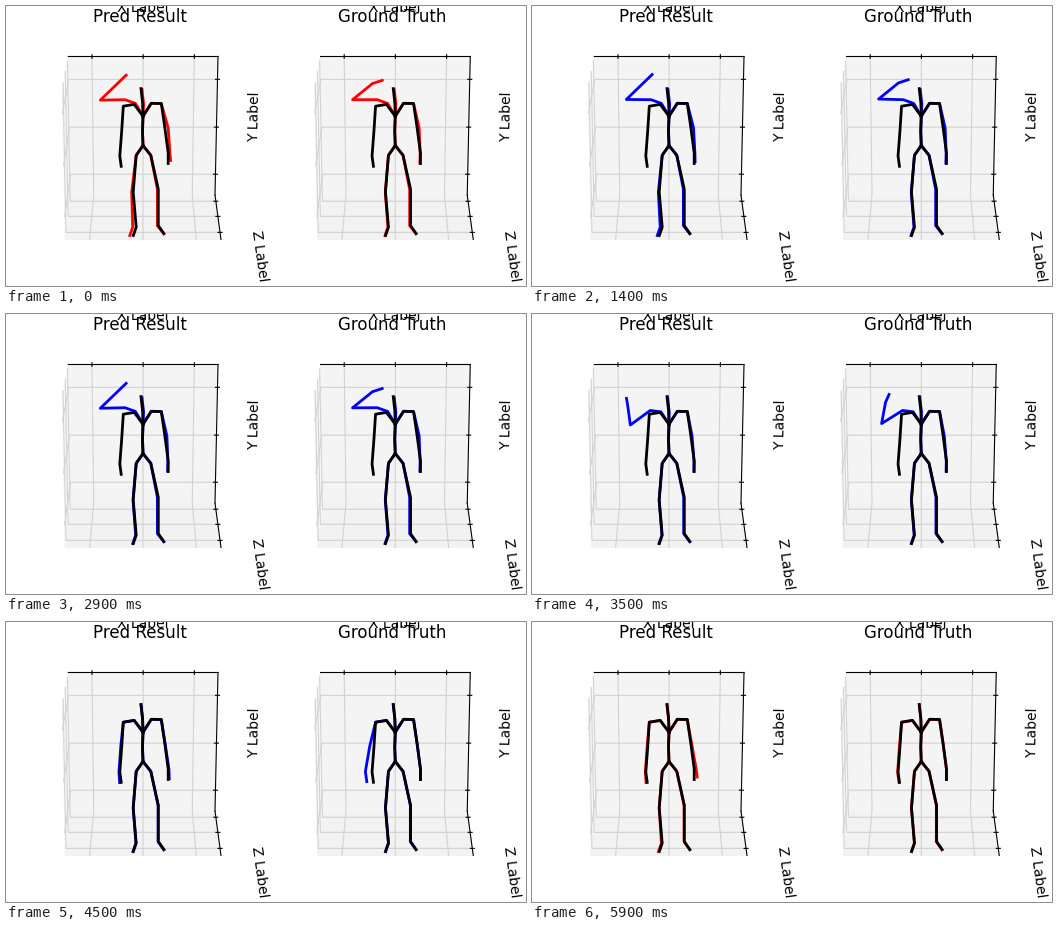
These frames come from a looping animation (520x280 px, 6 s). A matplotlib script:

```python
import numpy as np
import matplotlib.pyplot as plt
from matplotlib.animation import FuncAnimation

W, H, DPI = 520, 280, 100
FRAMES, INTERVAL = 60, 100
PANEL_SHIFT = 252.25
FIRST_BLUE, LAST_BLUE = 10, 49

plt.rcParams["font.family"] = "DejaVu Sans"
fig = plt.figure(figsize=(W / DPI, H / DPI), dpi=DPI, facecolor="white")
ax = fig.add_axes([0, 0, 1, 1])
ax.set_xlim(0, W)
ax.set_ylim(H, 0)
ax.axis("off")

# Reference pose, one chain of joints per limb
NECK, PELVIS = (137, 110.2), (137, 139.5)
REST = {
    "head": [(135, 82.6), (136.6, 97), NECK],
    "spine": [NECK, (136.5, 125), PELVIS],
    "left_arm": [NECK, (128.2, 98.4), (117.3, 100.2), (115.7, 125),
                 (113.8, 150), (115.2, 160.3)],
    "right_arm": [NECK, (145.3, 97.3), (155.3, 97.5), (158.9, 122),
                  (162.2, 147), (162.2, 157.5)],
    "left_leg": [PELVIS, (130.2, 149.3), (127.2, 186), (130.2, 221.2),
                 (127.3, 229.5)],
    "right_leg": [PELVIS, (144.8, 149.3), (152.3, 183.3), (152.3, 219.6),
                  (157.8, 227.6)],
}

# Arm angles in degrees, clockwise from screen right: raised, lowered, settled
PRED = dict(upper=(179, 96, 95), fore=(316, 94, 94), hand=(316, 86, 86),
            start=31, drift=1)
TRUE = dict(upper=(180, 104, 95), fore=(321, 100, 94), hand=(342, 82, 82),
            start=31.8, drift=0)
UPPER_LEN, FORE_LEN, HAND_LEN = 24.7, 25.7, 10.2


def ease(t, start, end):
    u = np.clip((t - start) / (end - start), 0, 1)
    return u * u * (3 - 2 * u)


def mix(a, b, u):
    a, b = np.asarray(a, float), np.asarray(b, float)
    return a + (b - a) * u


def step(point, length, angle):
    a = np.radians(angle)
    return point + length * np.array((np.cos(a), np.sin(a)))


def waving_arm(style, t):
    """Raised arm that drops: the upper arm leads, the forearm swings after."""
    drop = ease(t, 28.5, 43)
    swing = ease(t, style["start"], 43.5)
    settle = ease(t, 44, 52)

    def angle(part, u):
        raised, lowered, settled = style[part]
        return mix(raised, lowered, u) + (settled - lowered) * settle

    wobble = 1.5 * np.sin(np.pi * min(t, 28) / 28)
    depth = 1 - 0.53 * np.sin(np.pi * swing) ** 2
    shoulder = mix((119, 93.7), REST["left_arm"][2], drop)
    elbow = step(shoulder, UPPER_LEN, angle("upper", drop) + wobble)
    wrist = step(elbow, FORE_LEN * depth, angle("fore", swing))
    hand = step(wrist, HAND_LEN * depth, angle("hand", swing))
    return [shoulder, elbow, wrist, hand], 1 - drop


def moving_pose(style, t):
    pose = {name: np.array(pts, float) for name, pts in REST.items()}
    arm, lift = waving_arm(style, t)
    early = style["drift"] * (1 - ease(t, 8, 20))
    late = style["drift"] * ease(t, 41, 51)
    sway = early + late

    pose["left_arm"][1] += (1.2 * lift, -lift)
    pose["left_arm"][2:] = arm
    pose["head"][:2, 0] += lift
    pose["head"][:2, 1] += lift
    pose["right_arm"][3:, 0] += (2 * lift + 1.3 * early + 0.8 * late,
                                 2 * sway - 0.3 * lift, 3 * sway - 0.6 * lift)
    pose["right_arm"][5, 1] -= 2.5 * sway + 0.5 * lift
    foot = 3 * early + 0.8 * late + 0.5 * lift
    pose["left_leg"][2:, 0] -= (1.3 * early + 0.2 * lift, foot, foot)
    pose["right_leg"][2:4, 0] -= 0.2 + 0.7 * lift
    return pose


def stroke(pts, dx, color, lw, z):
    x, y = np.array(pts, float).T
    return ax.plot(x + dx, y, color=color, lw=lw, zorder=z, snap=False)[0]


def draw_box(dx):
    top_l, top_r = (62.3, 50.5), (212, 50.5)
    low_l, low_r = (65, 189), (209, 189)
    front_top, front_l, front_r = (56, 82), (59, 233.5), (215, 233.5)

    panes = [((top_l, low_l, front_l, front_top), "#f8f8f8"),
             ((low_l, low_r, front_r, front_l), "#f2f2f2"),
             ((top_l, top_r, low_r, low_l), "#f4f4f4")]
    for corners, color in panes:
        x, y = np.array(corners).T
        ax.fill(x + dx, y, color=color, lw=0.5, zorder=0)

    # Each grid family runs between three edges of the box
    across, down, depth = (0.158, 0.5, 0.842), (0.165, 0.51, 0.85), (0.14, 0.48, 0.84)
    families = [
        (across, (top_l, top_r), (low_l, low_r), (front_l, front_r)),
        (down, (front_top, front_l), (top_l, low_l), (top_r, low_r)),
        (depth, (top_l, front_top), (low_l, front_l), (low_r, front_r)),
    ]
    for fractions, *edges in families:
        for u in fractions:
            stroke([mix(a, b, u) for a, b in edges], dx, "#d2d2d2", 0.8, 1)

    ticks = [(top_l, top_r, across, (0, 1.8)),
             (top_r, low_r, down, (2, 0)),
             (low_r, front_r, depth, (2, 0))]
    for a, b, fractions, half in ticks:
        stroke((a, b), dx, "black", 0.8, 2)
        for u in fractions:
            p = mix(a, b, u)
            stroke((p - half, p + half), dx, "black", 0.8, 2)


def draw_labels(dx, title):
    ax.text(134 + dx, 16, title, size=12, ha="center", va="baseline")
    ax.text(136.7 + dx, 6, "X Label", size=10, ha="center", va="baseline")
    for x, y, name, angle in ((248.5, 111, "Y Label", 88.8),
                              (253.5, 249.5, "Z Label", -82.2)):
        ax.text(x + dx, y, name, size=10, rotation=angle,
                ha="center", va="center")


panels = []
for dx, title, style in ((0, "Pred Result", PRED),
                         (PANEL_SHIFT, "Ground Truth", TRUE)):
    draw_box(dx)
    draw_labels(dx, title)
    limbs = {name: stroke(pts, dx, "red", 2, 3) for name, pts in REST.items()}
    for pts in REST.values():
        stroke(pts, dx, "black", 2, 4)
    panels.append((dx, style, limbs))


def update(t):
    color = "blue" if FIRST_BLUE <= t <= LAST_BLUE else "red"
    changed = []
    for dx, style, limbs in panels:
        for name, pts in moving_pose(style, t).items():
            limbs[name].set_data(pts[:, 0] + dx, pts[:, 1])
            limbs[name].set_color(color)
            changed.append(limbs[name])
    return changed


anim = FuncAnimation(fig, update, frames=FRAMES, interval=INTERVAL, repeat=True)
plt.show()
```
